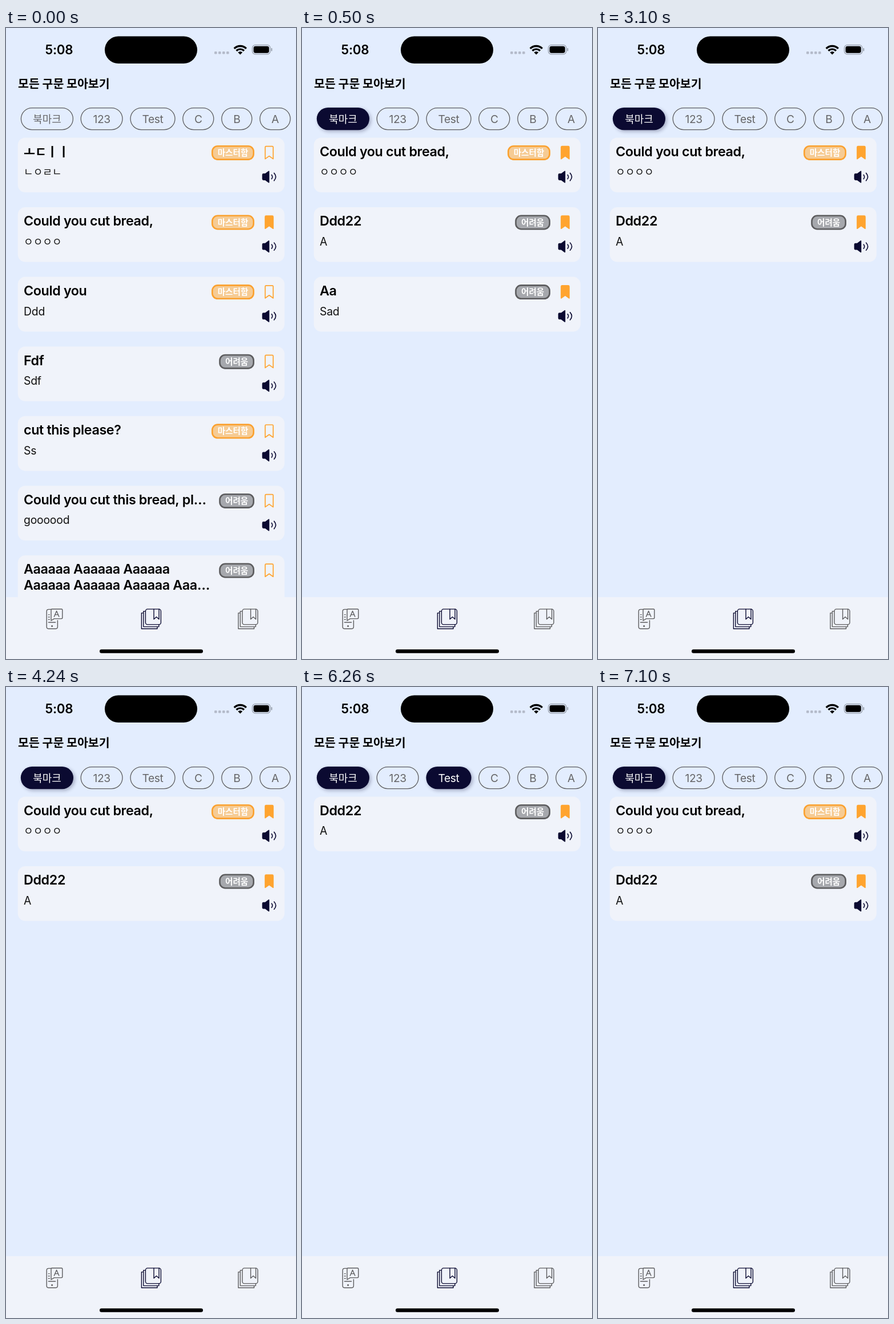
An HTML page with a canvas that plays this animation: 508x1102 px, repeating every 8000 ms.

```html
<!DOCTYPE html>
<html lang="ko">
<head>
<meta charset="utf-8">
<style>
  html, body { margin: 0; width: 100%; height: 100%; overflow: hidden; background: #e3edfe; }
  canvas { display: block; width: 508px; height: 1102px; }
</style>
</head>
<body>
<canvas id="stage"></canvas>
<script>
const W = 508, H = 1102, LOOP = 8000;
const BG = '#e3edfe', PANEL = '#f0f3fa', NAVY = '#0b0a31', GRAY = '#5c5c5e', ORANGE = '#ffa42f';
const canvas = document.getElementById('stage');
const ctx = canvas.getContext('2d');
const dpr = window.devicePixelRatio || 1;
canvas.width = W * dpr;
canvas.height = H * dpr;

const MASTERED = { label: '마스터함', x: 361.3, w: 72.4, line: '#fba12f', fill: '#f6cb93' };
const HARD = { label: '어려움', x: 374.5, w: 59.2, line: '#5c5c5e', fill: '#a6a8ad' };
const card = (title, sub, level, marked = false) => ({ title: [].concat(title), sub, level, marked });

const bread = card('Could you cut bread,', 'ㅇㅇㅇㅇ', MASTERED, true);
const ddd22 = card('Ddd22', 'A', HARD, true);
const aa = card('Aa', 'Sad', HARD, true);
const all = [
  card('ㅗㄷㅣㅣ', 'ㄴㅇㄹㄴ', MASTERED),
  bread,
  card('Could you', 'Ddd', MASTERED),
  card('Fdf', 'Sdf', HARD),
  card('cut this please?', 'Ss', MASTERED),
  card('Could you cut this bread, pl…', 'goooood', HARD),
  card(['Aaaaaa Aaaaaa Aaaaaa', 'Aaaaaa Aaaaaa Aaaaaa Aaa…'], '', HARD)
];

const tabs = [
  ['북마크', 26.4, 91], ['123', 131.2, 72.8], ['Test', 218, 78],
  ['C', 309.8, 54], ['B', 377.8, 53], ['A', 444.8, 53.2]
];

const scenes = [
  { until: 500, on: [], cards: all },
  { until: 3100, on: ['북마크'], cards: [bread, ddd22, aa] },
  { until: 5000, on: ['북마크'], cards: [bread, ddd22] },
  { until: 7100, on: ['북마크', 'Test'], cards: [ddd22] },
  { until: LOOP, on: ['북마크'], cards: [bread, ddd22] }
];

function text(str, x, y, size, weight, color, align = 'left', track = -0.012) {
  const korean = /[ㄱ-힣]/.test(str);
  const family = korean
    ? '"Noto Sans CJK KR", "Noto Sans CJK", sans-serif'
    : 'Inter, Roboto, sans-serif';
  const px = korean ? size * 0.935 : size;
  ctx.font = `${weight} ${px}px ${family}`;
  ctx.letterSpacing = korean ? '0px' : `${track * px}px`;
  ctx.textAlign = align;
  ctx.fillStyle = color;
  ctx.fillText(str, x, y);
}

function box(x, y, w, h, r, fill, line, width = 1.3) {
  ctx.beginPath();
  ctx.roundRect(x, y, w, h, r);
  if (fill) { ctx.fillStyle = fill; ctx.fill(); }
  if (line) { ctx.strokeStyle = line; ctx.lineWidth = width; ctx.stroke(); }
}

function stroke(d, color, width) {
  ctx.strokeStyle = color;
  ctx.lineWidth = width;
  ctx.stroke(new Path2D(d));
}

function at(x, y, draw) {
  ctx.save();
  ctx.translate(x, y);
  draw();
  ctx.restore();
}

function statusBar() {
  text('5:08', 68.5, 46, 22.3, 600, '#000');
  box(173, 14.5, 162, 47.5, 23.75, '#000');
  for (let i = 0; i < 4; i++) box(365 + i * 7, 41, 4.6, 4.6, 1.4, '#b4bbca');

  // Wi-Fi fan
  ctx.save();
  ctx.beginPath();
  ctx.moveTo(410.3, 46.6);
  ctx.lineTo(396.3, 32.6);
  ctx.lineTo(396.3, 26);
  ctx.lineTo(424.3, 26);
  ctx.lineTo(424.3, 32.6);
  ctx.clip();
  ctx.strokeStyle = '#000';
  for (const [r, w] of [[14.9, 3.3], [9.4, 3.2], [2.7, 5.4]]) {
    ctx.lineWidth = w;
    ctx.beginPath();
    ctx.arc(410.3, 46.4, r, Math.PI, 2 * Math.PI);
    ctx.stroke();
  }
  ctx.restore();

  box(431.5, 29.6, 31.4, 16.2, 5.2, null, '#979eab', 1.3);
  box(433.6, 31.7, 27.2, 12, 3.4, '#000');
  box(464.4, 35, 1.9, 5.4, 1, '#979eab');
}

function filterTab([label, x, w], on) {
  ctx.save();
  if (on) {
    ctx.shadowColor = 'rgba(11,10,49,0.3)';
    ctx.shadowBlur = 6 * dpr;
    ctx.shadowOffsetX = 2.5 * dpr;
    ctx.shadowOffsetY = 2.5 * dpr;
    box(x - 0.6, 138.9, w + 1.2, 39.4, 19.7, NAVY);
  } else {
    box(x, 139.6, w, 38, 19, null, GRAY);
  }
  ctx.restore();
  text(label, x + w / 2, 165.6, 19.2, 400, on ? '#fff' : '#666668', 'center', -0.02);
}

function bookmark(filled) {
  const d = 'M455.6 15.2H466.4Q468 15.2 468 16.8V37.2L461 32.2L454 37.2V16.8Q454 15.2 455.6 15.2Z';
  ctx.lineJoin = 'round';
  if (filled) {
    ctx.fillStyle = ORANGE;
    ctx.fill(new Path2D(d));
  }
  stroke(d, ORANGE, 1.7);
}

function speaker() {
  const d = 'M451 63.6H454.2L460.4 59V78.2L454.2 73.6H451Q449.6 73.6 449.6 72.2V65Q449.6 63.6 451 63.6Z';
  ctx.fillStyle = NAVY;
  ctx.fill(new Path2D(d));
  stroke(d, NAVY, 1.8);
  ctx.lineCap = 'round';
  stroke('M465.2 65Q468.2 68.6 465.2 72.2M469.6 62Q475.6 68.6 469.6 75.2', NAVY, 1.6);
}

function drawCard(c, i) {
  at(0, 191.4 + i * 121.6, () => {
    const extra = (c.title.length - 1) * 27.6;
    box(20.7, 0, 467.2, 95.6 + extra, 13, PANEL);
    c.title.forEach((line, n) => text(line, 31, 32.4 + n * 27.6, 23.3, 600, '#000', 'left', -0.016));
    text(c.sub, 31, 67 + extra, 19.4, 400, '#111');
    const b = c.level;
    box(b.x, 14.8, b.w, 23.4, 9.5, b.fill, b.line, 2.6);
    text(b.label, b.x + b.w / 2, 31.5, 15.6, 700, '#fff', 'center');
    bookmark(c.marked);
    at(0, extra, speaker);
  });
}

function phoneIcon() {
  ctx.lineJoin = 'round';
  ctx.lineCap = 'round';
  stroke('M79 1015.4H74.6Q71.2 1015.4 71.2 1018.8V1045.8Q71.2 1049.2 74.6 1049.2H87Q90.4 1049.2 90.4 1045.8V1034.6', GRAY, 1.4);
  stroke('M80.6 1014.8H97Q98.8 1014.8 98.8 1016.6V1029.8Q98.8 1031.6 97 1031.6H84.4L79 1035V1016.4Q79 1014.8 80.6 1014.8Z', GRAY, 1.4);
  stroke('M84.4 1028L88.6 1018.2L92.8 1028M86 1024.6H91.2', GRAY, 1.4);
  stroke('M74.4 1024.6H76.2M74.4 1028.8H76.2M74.4 1033H76.2M74.4 1038H86.6', GRAY, 1.4);
  ctx.beginPath();
  ctx.arc(80.6, 1044.6, 1.5, 0, 7);
  ctx.fillStyle = GRAY;
  ctx.fill();
}

function stackIcon(color) {
  ctx.lineJoin = 'round';
  box(7.6, 1014.9, 27, 27, 3.6, null, color, 1.4);
  stroke('M22.2 1015V1032.6L26.7 1028.4L31.2 1032.6V1015', color, 1.4);
  stroke('M7.4 1018.6H4V1045.6H31V1042.2', color, 1.4);
  stroke('M3.8 1021.6H.6V1049.2H28.2V1045.8', color, 1.4);
}

function tabBar() {
  ctx.fillStyle = PANEL;
  ctx.fillRect(0, 994, W, H - 994);
  phoneIcon();
  at(236.8, 0, () => stackIcon(NAVY));
  at(406.4, 0, () => stackIcon(GRAY));
  box(164, 1085.2, 181, 6.6, 3.3, '#000');
}

function render(t) {
  const scene = scenes.find(s => t < s.until);
  ctx.setTransform(dpr, 0, 0, dpr, 0, 0);
  ctx.fillStyle = BG;
  ctx.fillRect(0, 0, W, H);
  statusBar();
  text('모든 구문 모아보기', 21, 104.6, 22, 700, '#000');
  tabs.forEach(tab => filterTab(tab, scene.on.includes(tab[0])));
  scene.cards.forEach(drawCard);
  tabBar();
}

const start = performance.now();
function tick() {
  render((performance.now() - start) % LOOP);
  requestAnimationFrame(tick);
}
tick();
</script>
</body>
</html>
```
